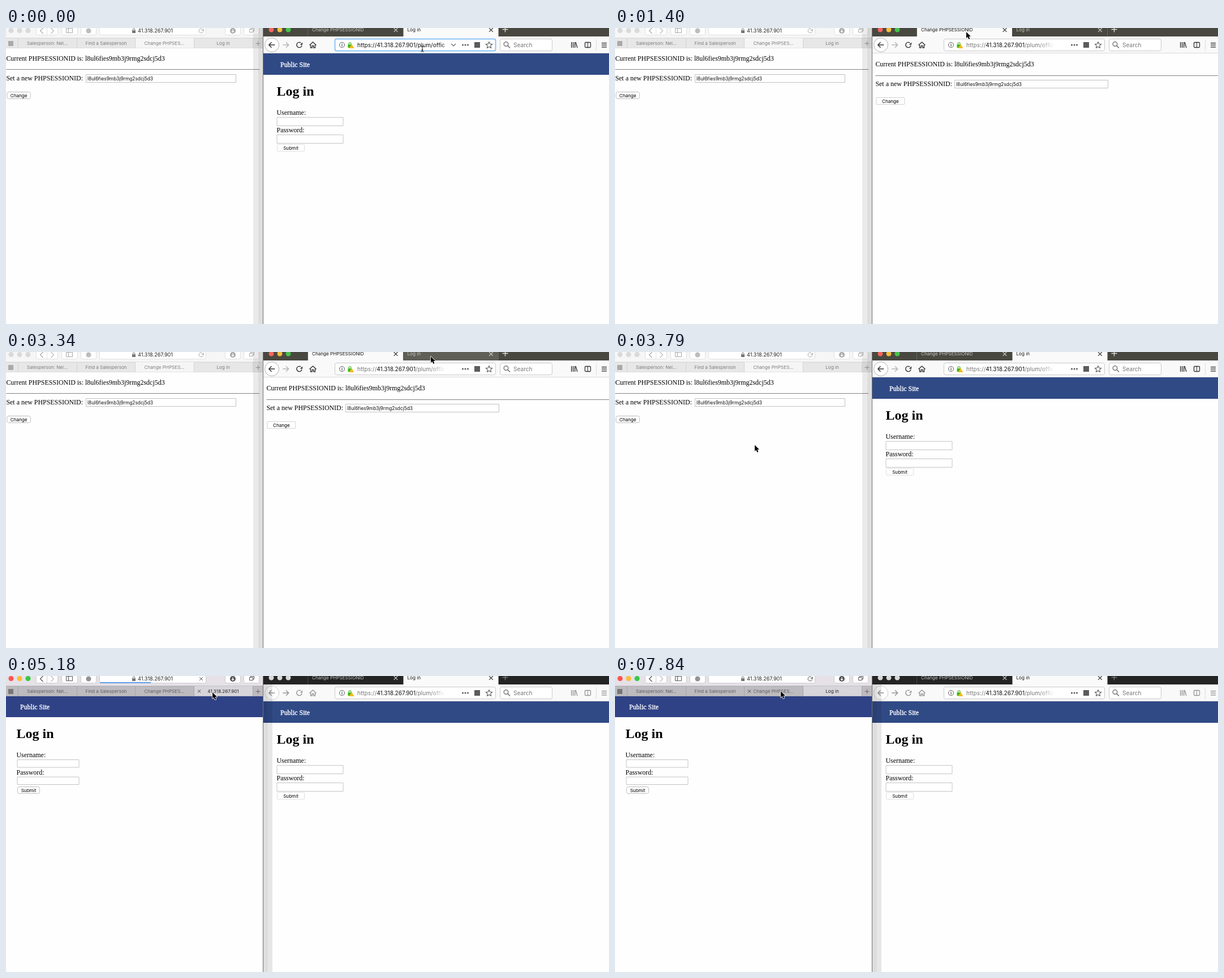
Write an HTML page with a canvas that moves like this. It is 1066 px wide and 525 px high and loops after 7990 ms.

```html
<!DOCTYPE html>
<html lang="en">
<head>
<meta charset="utf-8">
<title>Session demo</title>
<style>
html, body { margin: 0; width: 100%; height: 100%; overflow: hidden; background: #fff; }
canvas { display: block; }
</style>
</head>
<body>
<canvas id="stage" width="1066" height="525"></canvas>
<script>
const ctx = document.getElementById('stage').getContext('2d');
const LOOP = 7990, STEP = 150;
const TOKEN = 'l8ul6fies9mb3j9rmg2sdcj5d3';
const HOST = '41.318.267.901';
const SANS = 'Inter, Roboto, sans-serif';
const SERIF = '"Liberation Serif", "Noto Serif", serif';
const SMALL = '8.15px ' + SANS;
const FIELD = '10.1px ' + SANS;
const BODY = '11.95px ' + SERIF;
const LEFT_TAB = 103.7, RIGHT_TAB = 168.5;

// The pointer travels from its last place to `to` in even hops.
const home = [736, 37];
const moves = [
  { from: 450, until: 1250, to: [621, 7] },
  { from: 1400, until: 1850, to: [708, 34] },
  { from: 2590, until: 3340, to: [751, 8] },
  { from: 3640, until: 3790, to: [247, 165] },
  { from: 4080, until: 4740, to: [365, 29] },
  { from: 6070, until: 6510, to: [345, 3] },
  { from: 7100, until: 7840, to: [293, 27] }
];

function pointerAt(t) {
  let at = home;
  for (const { from, until, to } of moves) {
    if (t < from) break;
    const hops = Math.round((until - from) / STEP);
    const k = Math.min(1, Math.floor(hops * (t - from) / (until - from)) / hops);
    at = at.map((v, i) => v + (to[i] - v) * k);
  }
  return at;
}
// 0 when idle, otherwise the loading phase from 1 up.
function loading(t, starts) {
  const start = starts.find(s => t >= s && t < s + 3 * STEP);
  return start === undefined ? 0 : Math.floor((t - start) / STEP) + 1;
}
function stateAt(t) {
  const [x, y] = pointerAt(t);
  const leftFront = t >= 4080;
  return {
    x, y, leftFront,
    beam: !leftFront && x > 581 && x < 866 && y > 19 && y < 41,
    focus: t < 300 || t >= 1850 && t < 2140,
    rTab: t >= 1400 && t < 3640 ? 0 : 1,
    lTab: t >= 5030 ? 3 : 2,
    rLoad: loading(t, [300, 2140]),
    lLoad: loading(t, [5030, 6810]),
    rHover: !leftFront && y < 15 ? Math.floor((x - 534) / RIGHT_TAB) : -1,
    lHover: leftFront && y > 18 && y < 36 ? Math.floor((x - 22) / LEFT_TAB) : -1
  };
}

function rect(x, y, w, h, fill) {
  ctx.fillStyle = fill;
  ctx.fillRect(x, y, w, h);
}
function box(x, y, w, h, r, fill, stroke, lw = 1) {
  ctx.beginPath();
  ctx.roundRect(x + .5, y + .5, w - 1, h - 1, r);
  if (fill) { ctx.fillStyle = fill; ctx.fill(); }
  if (stroke) { ctx.strokeStyle = stroke; ctx.lineWidth = lw; ctx.stroke(); }
}
function disc(x, y, r, fill) {
  ctx.beginPath();
  ctx.arc(x, y, r, 0, 7);
  ctx.fillStyle = fill;
  ctx.fill();
}
function ring(x, y, r, color, lw = 1, from = 0, to = 7) {
  ctx.beginPath();
  ctx.arc(x, y, r, from, to);
  ctx.strokeStyle = color;
  ctx.lineWidth = lw;
  ctx.stroke();
}
function trace(x, y, p) {
  for (let i = 0; i < p.length; i += 2) ctx[i ? 'lineTo' : 'moveTo'](x + p[i], y + p[i + 1]);
}
function strokes(x, y, color, lw, ...paths) {
  ctx.beginPath();
  paths.forEach(p => trace(x, y, p));
  ctx.strokeStyle = color;
  ctx.lineWidth = lw;
  ctx.stroke();
}
function shape(x, y, fill, p) {
  ctx.beginPath();
  trace(x, y, p);
  ctx.closePath();
  ctx.fillStyle = fill;
  ctx.fill();
}
// Returns the x where the text ends.
function text(s, x, y, font, color = '#000', align = 'left') {
  ctx.font = font;
  ctx.fillStyle = color;
  ctx.textAlign = align;
  ctx.fillText(s, x, y);
  return x + ctx.measureText(s).width;
}
function clipped(x, y, w, h, draw) {
  ctx.save();
  ctx.beginPath();
  ctx.rect(x, y, w, h);
  ctx.clip();
  draw();
  ctx.restore();
}

function cross(x, y, r, color, lw = 1.2) {
  strokes(x, y, color, lw, [-r, -r, r, r], [r, -r, -r, r]);
}
function plus(x, y, r, color, lw) {
  strokes(x, y, color, lw, [-r, 0, r, 0], [0, -r, 0, r]);
}
function chevron(x, y, w, h, color) {
  strokes(x, y, color, 1.2, w > h ? [-w, -h, 0, h, w, -h] : [-w, -h, w, 0, -w, h]);
}
function arrow(x, y, dir, color) {
  strokes(x, y, color, 1.5, [-5.3 * dir, 0, 5.2 * dir, 0], [.5 * dir, -4.7, 5.2 * dir, 0, .5 * dir, 4.7]);
}
function reload(x, y, r, color, lw) {
  ring(x, y, r, color, lw, .2, 5.3);
  shape(x + r + 1, y, color, [0, -r, 0, -.3, -4.4, -.3]);
}
function padlock(x, y, w, h, color) {
  rect(x - w / 2, y, w, h, color);
  ring(x, y - .5, w / 3, color, 1.1, Math.PI, Math.PI * 2);
}
function star(x, y, r, color) {
  ctx.beginPath();
  for (let i = 0; i < 10; i++) {
    const a = (i * 36 - 90) * Math.PI / 180, d = i % 2 ? r * .47 : r;
    ctx.lineTo(x + d * Math.cos(a), y + d * Math.sin(a));
  }
  ctx.closePath();
  ctx.strokeStyle = color;
  ctx.lineWidth = 1.1;
  ctx.stroke();
}
function lights(x, y, colors) {
  colors.forEach((c, i) => disc(x + i * 15, y, 4.5, c));
}
function shade(x, y, w, alpha) {
  rect(x, y, w, 525 - y, `rgba(0,0,0,${alpha})`);
}
function pushButton(label, x, y, w, r, edge) {
  box(x, y, w, 13, r, '#fff', edge);
  text(label, x + w / 2, y + 9.5, SMALL, '#000', 'center');
}

function sessionPage(x, y, rule, end, fieldX, fieldW, buttonW, r, edge) {
  text('Current PHPSESSIONID is: ' + TOKEN, x, y, BODY);
  rect(x, rule, end - x, 1, '#828282');
  text('Set a new PHPSESSIONID:', x, y + 35, BODY);
  box(fieldX, y + 24, fieldW, 15, 0, '#fff', '#c2c2c2');
  text(TOKEN, fieldX + 3, y + 35, '8.35px ' + SANS, '#111');
  pushButton('Change', x + 1, y + 55, buttonW, r, edge);
}
function loginPage(x, top, left, blue, field, pitch, buttonY, buttonW, r, edge) {
  const [fx, fy, fw, fh] = field;
  rect(left, top, 612, 38, blue);
  text('Public Site', x + 6.5, top + 24, BODY, '#fff');
  ctx.strokeStyle = '#fff';
  ctx.lineWidth = .35;
  ctx.strokeText('Public Site', x + 6.5, top + 24);
  text('Log in', x, top + 75, 'bold 24px ' + SERIF);
  ['Username:', 'Password:'].forEach((label, i) => {
    text(label, x, top + 109 + i * 31, BODY);
    box(fx, fy + i * pitch, fw, fh, 0, '#fff', '#c4c4c4');
  });
  pushButton('Submit', fx + .5, buttonY, buttonW, r, edge);
}

function leftWindow(s) {
  const on = s.leftFront, login = s.lTab === 3;
  const tint = (front, back) => on ? front : back;
  const bar = tint(login ? '#e5e1e7' : '#e6e6e6', '#f6f6f6');
  const idle = tint(login ? '#bdbbbf' : '#bdbdbd', '#e7e7e7');
  const active = tint(login ? '#d7d5da' : '#d6d6d6', '#f5f5f5');
  const line = tint('#a5a5a7', '#d2d2d2');
  const ink = tint('#555', '#a9a9a9');
  const edge = tint('#cfcdd0', '#e0e0e0');

  rect(0, 0, 454, 525, '#fefefe');
  if (login) loginPage(18.5, 35, 0, '#2f4286', [19.5, 148, 110, 14.5], 30.5, 196, 40, 3, '#bdbdbd');
  else sessionPage(.4, 58, 73, 448, 141, 266, 42.5, 3, '#bdbdbd');

  rect(0, 0, 454, 18, bar);
  lights(9, 4.5, on ? ['#fb564f', '#fcbc3c', '#37c849'] : Array(3).fill('#dadada'));
  for (const [x, w] of [[53, 39], [98, 29], [132, 28], [165, 189], [387, 28], [420, 28]])
    box(x, -8, w, 21, 3, '#fff', edge);
  rect(72, 0, 1, 12, edge);
  chevron(63, 5, -2.5, 5, ink);
  chevron(82, 5, 2.5, 5, '#bbb');
  box(106, 0, 12, 9, 0, null, ink);
  rect(110, 0, 1, 9, ink);
  disc(146, 5, 4.5, tint('#929292', '#bdbdbd'));
  padlock(226, 4, 6, 5, '#777');
  text(HOST, 233, 8, '9.1px ' + SANS, '#222');
  if (s.lLoad) {
    cross(345, 5, 3, ink, 1);
    rect(166, 11, 45 * s.lLoad, 1.5, '#3b8cf0');
  } else reload(345, 5, 3.8, ink, 1);
  disc(401, 5, 5, ink);
  strokes(401, 5, '#fff', 1.2, [0, -3, 0, 2.5], [-2, .5, 0, 2.5, 2, .5]);
  box(432, 0, 7, 6, 0, null, ink);
  box(430, 2, 7, 6, 0, '#fff', ink);

  rect(0, 18, 454, 18, idle);
  rect(0, 17.5, 454, 1, line);
  const last = s.lLoad && login ? HOST : 'Log in';
  ['Salesperson: Nel...', 'Find a Salesperson', 'Change PHPSES...', last].forEach((title, i) => {
    const x = Math.round(22 + i * LEFT_TAB), current = i === s.lTab;
    if (current) rect(x, 18, LEFT_TAB, 18, active);
    rect(x - 1, 18, 1, 18, line);
    text(title, x + 51, 30, SMALL, tint(current ? '#222' : '#5c5c5c', '#7c7c7c'), 'center');
    if (i === s.lHover) cross(x + 8.5, 27, 2.6, '#444', 1);
  });
  rect(436, 18, 1, 18, line);
  rect(0, 35.5, 454, .5, line);
  rect(4, 23, 9, 9, tint('#777', '#aaa'));
  plus(445.5, 27.5, 4, tint('#666', '#999'), 1);
  if (!on) {
    shade(437, 0, 17, .08);
    shade(446, 0, 8, .05);
  }
}

function urlBar(s) {
  const dim = s.focus ? '#111' : '#777';
  box(581, 19, 285, 22, 3, '#fff', s.focus ? '#8cc4f6' : '#c8c8c8', s.focus ? 2 : 1);
  ring(594, 30, 4.6, '#666');
  rect(593.4, 29, 1.3, 4, '#666');
  rect(593.4, 27, 1.3, 1.3, '#666');
  padlock(608, 29, 7, 6, '#3fb618');
  shape(611, 28.5, '#f5b91e', [0, 0, 4.5, 7.5, -4.5, 7.5]);
  clipped(618, 21, 162, 18, () => {
    let x = 621;
    [['https://', dim], [HOST, '#111'], ['/plum/offic', dim]]
      .forEach(([part, color]) => { x = text(part, x, 34, FIELD, color); });
    const from = s.focus ? 768 : 750;
    const fade = ctx.createLinearGradient(from, 0, from + 27, 0);
    fade.addColorStop(0, 'rgba(255,255,255,0)');
    fade.addColorStop(1, '#fff');
    rect(from, 21, 32, 18, fade);
  });
  if (s.beam) chevron(791, 30, 4, 2, '#666');
  for (let i = 0; i < 3; i++) disc(807.5 + i * 4.5, 30, 1.5, '#555');
  rect(828, 25, 10, 10, '#5c5c5c');
  star(854, 30.5, 6, '#555');
}

function rightWindow(s) {
  const on = !s.leftFront;
  const ink = on ? '#333' : '#949494', divider = on ? '#65645d' : '#454545';
  rect(455, 0, 611, 525, '#fefefe');
  rect(455, 0, 611, 15, on ? '#494840' : '#242424');
  lights(469, 3, on ? ['#f8655d', '#f6bd3e', '#45c448'] : Array(3).fill('#d8d8d8'));
  rect(533, 0, 1, 15, divider);
  rect(870, 0, 1, 15, divider);
  ['Change PHPSESSIONID', 'Log in'].forEach((title, i) => {
    const x = 534 + i * RIGHT_TAB, current = i === s.rTab;
    if (current) rect(x, 0, 168, 15, '#fafafa');
    else if (i === s.rHover) rect(x, 0, 168, 15, '#5f5e57');
    const busy = current && s.rLoad;
    if (busy) disc(x + 4 + s.rLoad * 2, 3, 1.6, '#555');
    text(title, x + (busy ? 23 : 7), 6, SMALL, current ? '#111' : '#c6c6c3');
    cross(x + 155, 3.5, 3.4, current ? '#333' : '#ccc');
  });
  plus(882.5, 2.5, 5, on ? '#ddd' : '#777', 1.4);

  rect(455, 15, 611, 30, '#f9f9fa');
  rect(455, 44, 611, 1, '#d9d9da');
  disc(470, 30, 12.5, '#fff');
  ring(470, 30, 12.5, on ? '#b2b2b2' : '#cfcfcf');
  arrow(470, 30, -1, ink);
  arrow(494.5, 30, 1, on ? '#b5b5b5' : '#949494');
  if (s.rLoad === 1) cross(518.5, 30, 4, ink, 1.6);
  else reload(518.5, 30, 4.6, ink, 1.5);
  strokes(542.5, 30, ink, 1.4, [-6, .5, 0, -5, 6, .5], [-4, 0, -4, 5, -1.3, 5, -1.3, 1.5, 1.3, 1.5, 1.3, 5, 4, 5, 4, 0]);
  urlBar(s);
  box(873, 19, 93, 22, 3, '#fff', '#c8c8c8');
  ring(884, 28.5, 3.8, '#666', 1.3);
  strokes(887, 31.5, '#666', 1.5, [0, 0, 4, 4]);
  text('Search', 897, 34, FIELD, '#777');
  for (let i = 0; i < 3; i++) {
    rect(999 + i * 3, 25, 1.4, 10, ink);
    rect(1053, 26 + i * 3.5, 9, 1.4, ink);
  }
  strokes(1007, 25, ink, 1.4, [0, 0, 3, 10]);
  box(1023, 25, 11, 10, 1.5, null, ink, 1.3);
  rect(1028, 25, 1, 10, ink);
  rect(1043, 20, 1, 21, '#dcdcdc');

  if (s.rTab) loginPage(478.5, 45, 455, '#304a86', [478.5, 158, 118, 16], 31, 206, 49, 1, '#dedede');
  else sessionPage(460.4, 68, 84, 1066, 600, 272, 51, 1, '#d2d2d2');
  if (!on) {
    shade(455, 15, 16, .09);
    shade(455, 15, 8, .04);
  }
}

function pointer({ x, y, beam }) {
  if (beam) {
    const serif = d => [-2.5, 5.5 * d, 0, 4 * d, 2.5, 5.5 * d];
    strokes(x, y, '#111', 1, serif(-1), [0, -4, 0, 4], serif(1), [-1.5, 2, 1.5, 2]);
    return;
  }
  shape(x, y, '#000', [0, 0, 0, 11, 2.5, 8.8, 4.4, 13, 6.4, 12.1, 4.6, 8, 8, 8]);
  ctx.globalCompositeOperation = 'source-over';
  ctx.strokeStyle = '#fff';
  ctx.lineWidth = 1.6;
  ctx.lineJoin = 'round';
  ctx.stroke();
  ctx.fill();
}

function draw(now) {
  const s = stateAt(now % LOOP);
  clipped(0, 0, 454, 525, () => leftWindow(s));
  clipped(455, 0, 611, 525, () => rightWindow(s));
  rect(454, 0, 1, 525, '#707070');
  pointer(s);
  requestAnimationFrame(draw);
}
requestAnimationFrame(draw);
</script>
</body>
</html>
```
